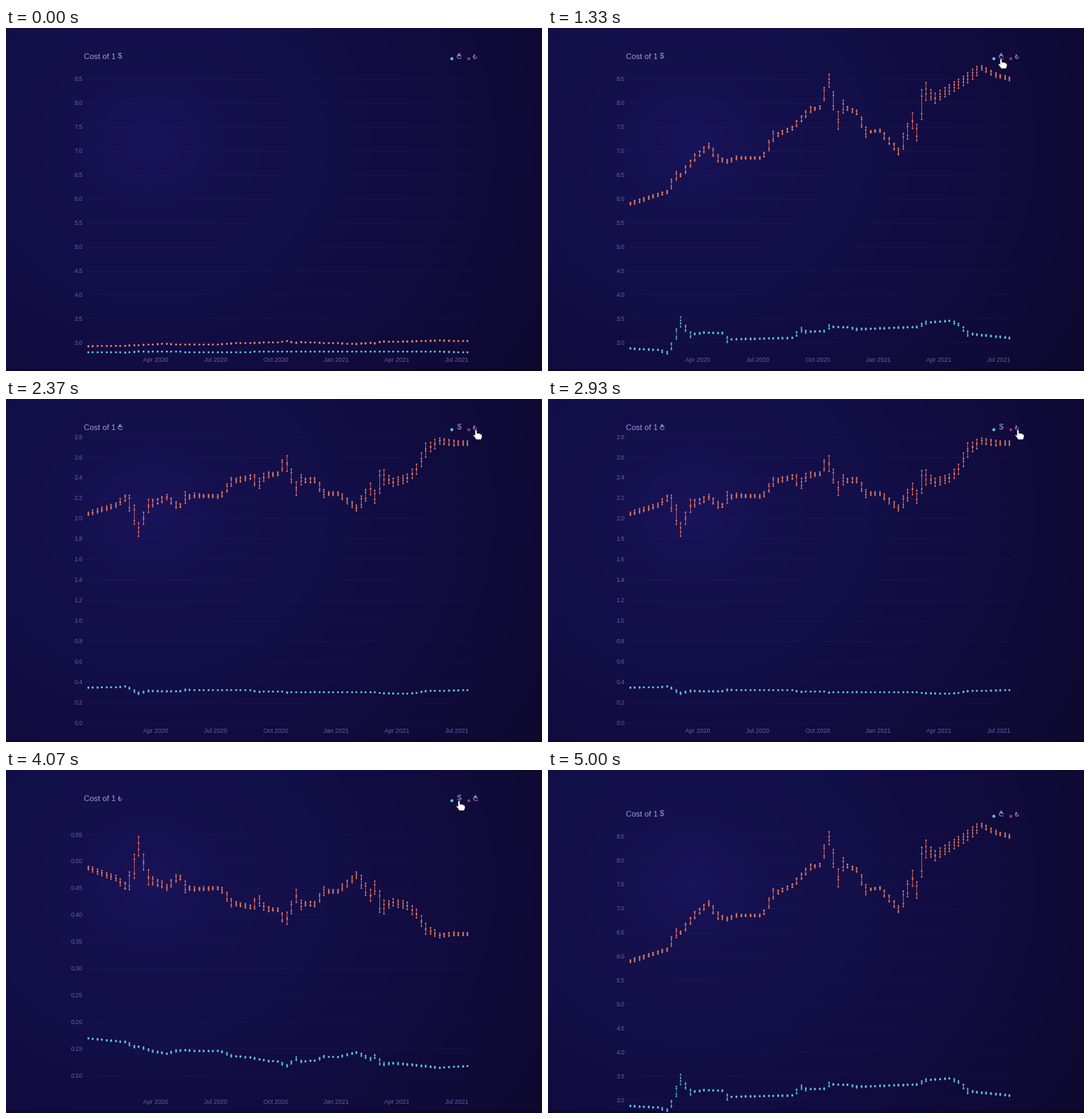
Animation of 758x486 px, one loop 5.03 s. Source, as a matplotlib script:

```python
import numpy as np
import matplotlib.pyplot as plt
from matplotlib.animation import FuncAnimation
from matplotlib.patches import Polygon
from matplotlib.transforms import Affine2D, Bbox

W, H, DPI = 758, 486, 100
LOOP, FRAMES = 5030, 151
BOTTOM, TOP = 459, 53
PX = 72 / DPI

LAVENDER, MUTED = "#a196dc", "#665aa8"
CYAN, ORANGE = "#62c8e2", "#ee8460"
TEAL, PINK = "#2f7da6", "#cc5664"

N = 83
WEEK = np.arange(N)
X = 115 + 6.545 * WEEK


def trend(*turns):
    """Weekly rate running straight between (week, rate) turning points."""
    return np.interp(WEEK, *np.transpose(turns))


def candles(mid, calm, swing):
    """Rows low, open, close, high; a week is as wide as the move into it."""
    span = calm + swing * np.abs(np.diff(mid, prepend=mid[0]))
    drift = np.clip(np.gradient(mid) / 2, -0.3 * span, 0.3 * span)
    return np.array([mid - span / 2, mid - drift, mid + drift, mid + span / 2])


def invert(c):
    return 1 / c[::-1]


usd_try = trend(
    (0, 5.9), (6, 6.08), (8, 6.14), (10, 6.48), (11, 6.49), (14, 6.86), (17, 7.1),
    (19, 6.84), (21, 6.78), (23, 6.85), (28, 6.85), (29, 6.92), (31, 7.3), (35, 7.47),
    (39, 7.86), (41, 7.9), (43, 8.46), (45, 7.63), (46, 7.92), (49, 7.8), (51, 7.39),
    (54, 7.42), (58, 6.98), (61, 7.62), (62, 7.38), (63, 7.96), (64, 8.23), (66, 8.1),
    (72, 8.46), (76, 8.73), (79, 8.58), (82, 8.5))
usd_gel = trend(
    (0, 2.88), (6, 2.85), (8, 2.79), (9, 2.93), (11, 3.43), (13, 3.17), (16, 3.21),
    (20, 3.2), (21, 3.07), (35, 3.1), (37, 3.27), (38, 3.23), (42, 3.24), (43, 3.33),
    (47, 3.32), (49, 3.28), (62, 3.33), (64, 3.42), (69, 3.455), (71, 3.38), (73, 3.19),
    (82, 3.1))

nervous = (WEEK > 58) & (WEEK < 76)
lira = candles(usd_try, np.where(nervous, 0.15, 0.045), 0.8)
lari = candles(usd_gel, 0.02, 0.75)
cross = lira / lari[::-1]


def mode(symbol, others, series, domain, ticks, fmt):
    return dict(symbol=symbol, others=others, series=np.array(series),
                domain=np.array(domain), ticks=ticks, fmt=fmt)


MODES = {
    "usd": mode("$", "₾₺", [lari, lira], (2.794, 8.765), np.arange(6, 18) / 2, "%.1f"),
    "gel": mode("₾", "$₺", [invert(lari), cross], (-0.005, 2.8), np.arange(15) / 5, "%.1f"),
    "try": mode("₺", "$₾", [invert(lira), invert(cross)], (0.0644, 0.6),
                np.arange(2, 12) / 20, "%.2f"),
}
STEPS = [(-110, "usd"), (1750, "gel"), (2960, "try"), (4220, "usd")]
MORPH = 500


def ease(x):
    x = min(max(x, 0), 1)
    return 4 * x ** 3 if x < 0.5 else 1 - 4 * (1 - x) ** 3


def background():
    y, x = np.mgrid[0:H, 0:W]
    d = np.hypot(x - 205, (y - 160) * 1.1)
    stops = [0, 90, 220, 400, 640]
    rgb = [np.interp(d, stops, c) for c in
           ([25, 21, 19, 16, 14], [19, 16, 15, 12, 9], [90, 78, 73, 63, 47])]
    img = np.stack(rgb, axis=-1)
    img[483:] *= 0.7
    return img.round().astype(np.uint8)


fig = plt.figure(figsize=(W / DPI, H / DPI), dpi=DPI)
fig.figimage(background(), origin="upper", zorder=-1)
ax = fig.add_axes([0, 0, 1, 1])
ax.set(xlim=(-0.5, W - 0.5), ylim=(H - 0.5, -0.5))
ax.axis("off")

scroll = Affine2D()
PAGE = scroll + ax.transData
BELOW_HEADER = Bbox([[0, 0], [W, H - 32]])


def label(x, y, text, size, color, font="Liberation Sans", **kw):
    return ax.text(x, y, text, fontsize=size * PX, color=color, family=font,
                   transform=PAGE, **kw)


def tick_label(text):
    t = label(108, 0, text, 8.6, MUTED, ha="right", clip_on=True)
    t.set_clip_box(BELOW_HEADER)
    return t


def grid_line():
    return ax.plot([112, 655], [0, 0], color="#4a3cb0", lw=0.7 * PX, transform=PAGE)[0]


def glyph(symbol, x, y):
    """Currency sign with its left end at x and its baseline at y."""
    if symbol == "$":
        return label(x, y, "$", 11.2, LAVENDER)
    if symbol == "₺":
        return label(x - 0.5, y, "₺", 9.5, LAVENDER, "DejaVu Sans")
    a = np.radians(np.arange(0, 271, 15))
    nan = [np.nan]
    gx = np.concatenate([3.3 + 2.8 * np.cos(a), [6.4], nan, [2.5, 2.5], nan, [4.1, 4.1]])
    gy = np.concatenate([3 + 2.6 * np.sin(a), [0.4], nan, [7.6, 3.8], nan, [7.6, 3.8]])
    return ax.plot(x + gx, y - gy, color=LAVENDER, lw=0.9 * PX, transform=PAGE)[0]


# Axes
for m in MODES.values():
    m["labels"] = [tick_label(m["fmt"] % v) for v in m["ticks"]]
    m["grid"] = [grid_line() for _ in m["ticks"]]

DATES = "Apr 2020", "Jul 2020", "Oct 2020", "Jan 2021", "Apr 2021", "Jul 2021"
for n, text in enumerate(DATES):
    label(211 + 85.2 * n, 472, text, 8.6, MUTED, ha="center")

# Title and legend
label(110, 43, "Cost of 1", 11.2, LAVENDER)
slots = [{s: glyph(s, x, 43) for s in "$₾₺"} for x in (157.5, 637, 660)]
for x, color in ((629.5, CYAN), (653.5, "#983a66")):
    ax.plot(x, 42.5, "o", color=color, ms=4.2 * PX, mew=0, transform=PAGE)

# Candles: blue series first, orange second
stems, dots = [], []
for stem, dot in ((TEAL, CYAN), (PINK, ORANGE)):
    stems.append(ax.plot([], [], color=stem, lw=1.1 * PX, transform=PAGE)[0])
    dots.append(ax.plot([], [], "o", color=dot, ms=2.1 * PX, mew=0, transform=PAGE)[0])
DOT_X = np.tile(X, 4)
STEM_X = np.repeat(X, 3)

# Pointer
ARROW = np.array([(0, 0), (0, 15.5), (3.6, 12.4), (6, 17.8), (8.6, 16.7), (6.3, 11.4), (11, 11)])
HAND = np.array([(-1.5, 1), (-0.6, 0), (0.8, 0), (1.6, 1), (1.6, 4.8), (3.8, 4.8), (6.2, 5.6),
                 (8, 6.6), (8.8, 7.6), (8.8, 10.5), (7.6, 14.3), (0.2, 14.3), (-1, 12),
                 (-4, 8.4), (-3.8, 7), (-2.6, 6.9), (-1.5, 8)])
arrow = ax.add_patch(Polygon(ARROW, fc="#0a0820", ec="white", lw=1.2 * PX, zorder=9))
hand = ax.add_patch(Polygon(HAND, fc="white", ec="#0a0820", lw=0.9 * PX, zorder=9))
# Stops as (time, x, y)
ROUTE = np.array([(200, 440, -20), (570, 552.5, 40), (1000, 640, 43), (1800, 640, 43),
                  (2030, 657, 42), (2200, 664, 43), (3000, 664, 43), (3300, 640, 43),
                  (4260, 640, 43)])


def move_pointer(t):
    times, xs, ys = ROUTE.T
    shown = times[0] <= t <= times[-1]
    x, y = np.interp(t, times, xs), np.interp(t, times, ys)
    over = min(abs(x - 640), abs(x - 664)) < 5
    arrow.set_visible(shown and not over)
    hand.set_visible(shown and over)
    arrow.set_xy(ARROW + (x, y))
    hand.set_xy(HAND + (x, y))


def place_ticks(m, alpha, to_y):
    for v, text, line in zip(m["ticks"], m["labels"], m["grid"]):
        y = to_y(v)
        shown = alpha > 0.01 and -20 < y < H + 20
        text.set_visible(shown)
        line.set_visible(shown)
        if shown:
            text.set(y=y + 3.1, alpha=alpha)
            line.set(ydata=[y, y], alpha=0.16 * alpha)


def update(i):
    t = i * LOOP / FRAMES
    k = max(n for n, (start, _) in enumerate(STEPS) if start <= t)
    now = MODES[STEPS[k][1]]
    old = MODES[STEPS[max(k - 1, 0)][1]]
    p = ease((t - STEPS[k][0]) / MORPH)

    # The first step grows everything from the bottom of the scale
    before = old["series"] if k else np.full_like(now["series"], now["domain"][0])
    series = before + (now["series"] - before) * p
    lo, hi = old["domain"] + (now["domain"] - old["domain"]) * p

    def to_y(v):
        return BOTTOM - (v - lo) / (hi - lo) * (BOTTOM - TOP)

    for m in MODES.values():
        alpha = p if m is now else 1 - p if m is old else 0
        place_ticks(m, 1 if m is now is old else alpha, to_y)

    fade = min(max((t - 580) / 400, 0), 1)
    for c, stem, dot, strength in zip(to_y(series), stems, dots, (0.75, 0.9)):
        dot.set_data(DOT_X, c.ravel())
        gap = np.full(N, np.nan)
        stem.set_data(STEM_X, np.column_stack([c[0], c[3], gap]).ravel())
        stem.set_alpha(strength * (0.15 + 0.85 * fade))

    for slot, symbol in zip(slots, now["symbol"] + now["others"]):
        for s, artist in slot.items():
            artist.set_visible(s == symbol)

    move_pointer(t)
    pull = min(max((t - 4830) / 166, 0), 1)
    scroll.clear().translate(0, 22 * pull ** 2)
    return []


anim = FuncAnimation(fig, update, frames=FRAMES, interval=LOOP / FRAMES,
                     init_func=lambda: [], repeat=True, repeat_delay=0, blit=False)
plt.show()
```
